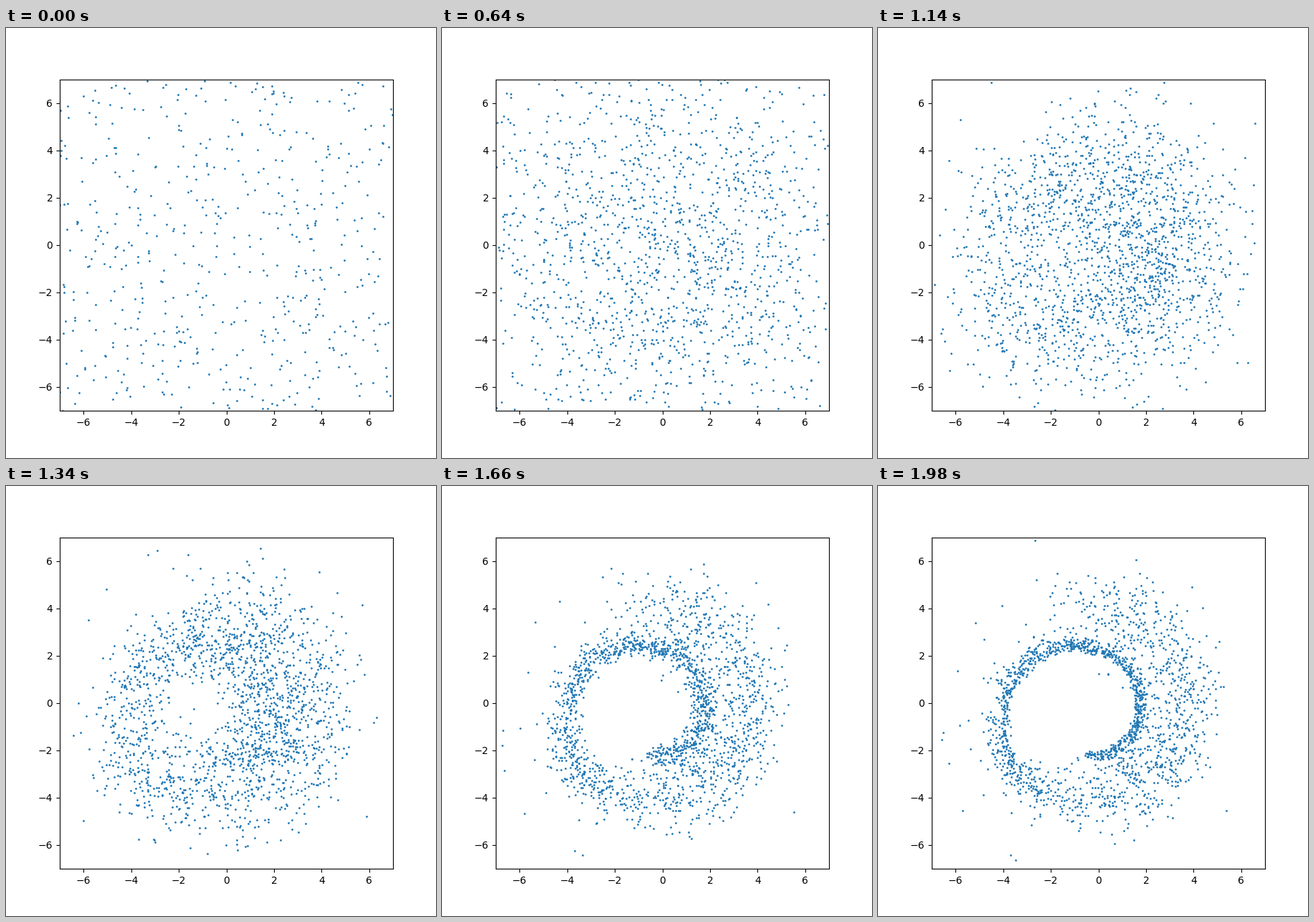
These frames come from a looping animation (600 px wide and 600 px high, 2000 ms). A matplotlib script:

```python
import numpy as np
import matplotlib.pyplot as plt
from matplotlib.animation import FuncAnimation

FRAMES = 100
N = 1850
SCALE = 0.365
CENTER = np.array([-0.6, -0.45])

rng = np.random.default_rng(12)


def smoothstep(x, lo, hi):
    x = np.clip((x - lo) / (hi - lo), 0, 1)
    return x * x * (3 - 2 * x)


def sample_roll(n):
    """Swiss roll with a crisp inner turn and a diffuse outer one."""
    turn = 1.5 + 3 * rng.random(n) ** 0.85
    angle = np.pi * turn
    outer = smoothstep(turn, 3.0, 3.6)
    width = 0.17 + 0.1 * smoothstep(turn, 2, 3) + 0.32 * outer
    offset = width * rng.normal(size=n)
    inner = turn < 3.2
    offset[inner & (offset < 0)] *= 0.55

    # Loose points between the turns and outside the roll
    fill = (turn > 3.4) & (rng.random(n) < 0.5)
    offset -= fill * 1.9 * rng.random(n)
    halo = rng.random(n) < np.where(inner, 0.2, 0.1)
    offset += halo * rng.exponential(0.9, n)

    radius = SCALE * angle + offset
    angle = angle + 0.2 * outer * rng.normal(size=n)
    return CENTER + radius[:, None] * np.column_stack([np.cos(angle), np.sin(angle)])


roll = sample_roll(N)
noise = rng.normal(size=(N, 2))


def sigma(i):
    return 9 * (1 - 0.95 * i / FRAMES) ** 2.4


fig, ax = plt.subplots(figsize=(6, 6), dpi=100)
ax.set_xlim(-7, 7)
ax.set_ylim(-7, 7)
dots, = ax.plot([], [], "o", color="C0", markersize=1)


def update(i):
    dots.set_data(*(roll + sigma(i) * noise).T)
    return dots,


anim = FuncAnimation(fig, update, frames=FRAMES, interval=20,
                     repeat=True, repeat_delay=0)
plt.show()
```
